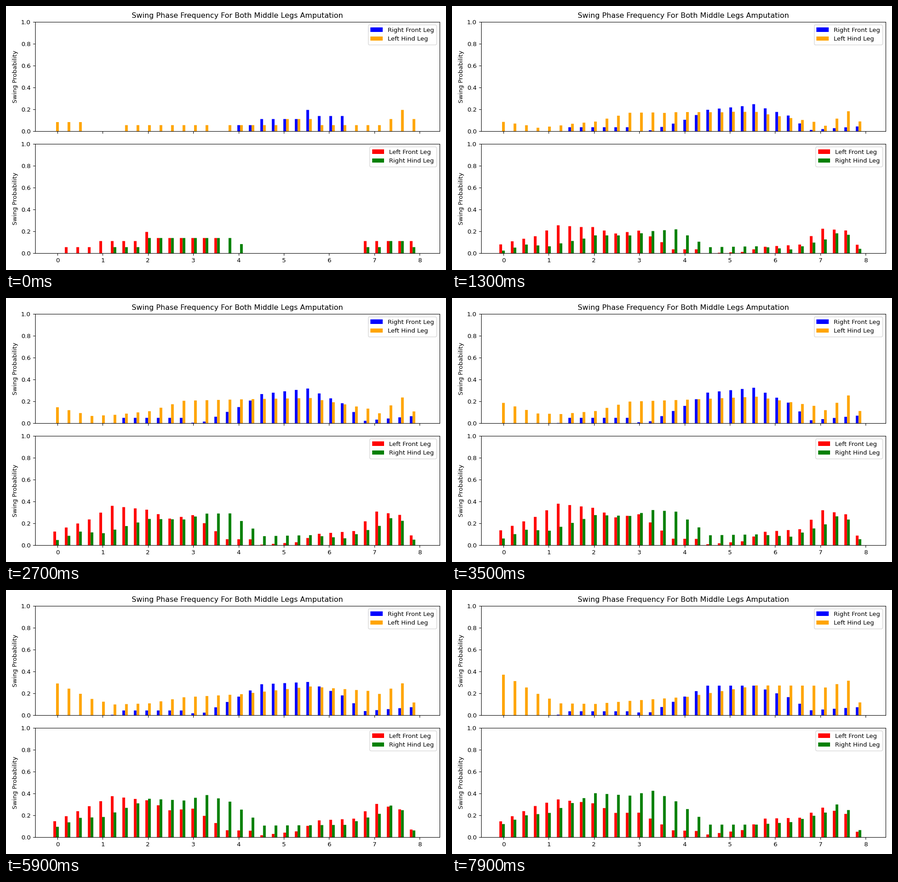
These frames come from a looping animation (966 by 580 pixels, 8 s). A matplotlib script:

```python
import numpy as np
import matplotlib.pyplot as plt
from matplotlib.animation import FuncAnimation

W, H, DPI = 966, 580, 96.6
FRAMES, INTERVAL = 80, 100
BINS = np.arange(32)
X = np.linspace(0, 8, 64)[::2]
BAR = 0.06
YOUNG, MIDDLE, LATE = 18, 48, 78


def cycles(step):
    """Number of recorded cycles, growing evenly."""
    return 36 + 11 * step


class Leg:
    """Swing counts per phase bin; bar height is counts over cycles.

    windows: (first bin, last bin, count) at the start
    points:  (bin, height when young, height when late)
    swell:   how far the middle state rises above the mean of those two
    """

    def __init__(self, windows, points, swell):
        self.first = np.zeros(len(BINS))
        for lo, hi, count in windows:
            self.first[lo:hi + 1] = count
        keys, young, late = zip(*points)
        young = np.interp(BINS, keys, young, left=0)
        late = np.interp(BINS, keys, late, left=0)
        self.young = young * cycles(YOUNG)
        self.middle = swell * (young + late) / 2 * cycles(MIDDLE)
        self.late = late * cycles(LATE)

    def heights(self, step):
        if step < YOUNG:
            u = (step / YOUNG) ** 1.4
            counts = self.first + (self.young - self.first) * u
        else:
            # parabola through three evenly spaced states
            u = (step - YOUNG) / (MIDDLE - YOUNG)
            counts = (self.young * (u - 1) * (u - 2) / 2
                      + self.middle * u * (2 - u)
                      + self.late * u * (u - 1) / 2)
        return np.maximum(counts, 0) / cycles(step)


right_front = Leg(
    [(16, 17, 2), (18, 21, 4), (22, 22, 7), (23, 25, 5)],
    [(5, 0, .005), (6, .046, .036), (11, .046, .036), (12, 0, .025),
     (13, .011, .027), (16, .126, .17), (18, .235, .27), (22, .29, .27),
     (25, .165, .165), (27, .015, .045), (31, .055, .073)],
    swell=1.13)

left_hind = Leg(
    [(0, 2, 3), (6, 13, 2), (15, 19, 2), (20, 22, 4), (23, 28, 2),
     (29, 31, 4), (30, 30, 7)],
    [(0, .098, .37), (3, .04, .195), (5, .067, .108), (8, .105, .103),
     (11, .207, .131), (16, .215, .168), (22, .21, .272), (27, .102, .27),
     (28, .057, .253), (30, .208, .315), (31, .1, .117)],
    swell=1.06)

left_front = Leg(
    [(1, 3, 2), (4, 7, 4), (8, 8, 7), (9, 14, 5), (27, 31, 4)],
    [(0, .102, .145), (3, .19, .285), (5, .31, .345), (8, .28, .31),
     (10, .212, .222), (12, .245, .224), (15, .045, .063), (17, .045, .057),
     (18, 0, .025), (21, .015, .065), (23, .075, .17), (26, .1, .178),
     (28, .27, .27), (30, .25, .213), (31, .085, .05)],
    swell=1.17)

right_hind = Leg(
    [(5, 7, 2), (8, 15, 5), (16, 16, 3), (27, 31, 2), (29, 30, 4)],
    [(0, .03, .12), (2, .1, .2), (4, .08, .222), (8, .19, .402),
     (11, .189, .38), (13, .24, .424), (15, .26, .328), (18, .07, .115),
     (22, .08, .115), (25, .044, .138), (28, .153, .225), (29, .217, .299),
     (30, .2, .248), (31, .044, .065)],
    swell=1.09)

plt.rcParams["font.family"] = "DejaVu Sans"
# the small extra keeps rounding from dropping a pixel
fig, (upper, lower) = plt.subplots(
    2, 1, sharex=True, dpi=DPI, facecolor="white",
    figsize=((W + 0.01) / DPI, (H + 0.01) / DPI))


def add_bars(ax, leg, shift, color, label):
    bars = ax.bar(X + shift, leg.heights(0), BAR, color=color, label=label,
                  snap=False)
    return leg, bars


groups = [
    add_bars(upper, right_front, -BAR, "blue", "Right Front Leg"),
    add_bars(upper, left_hind, 0, "orange", "Left Hind Leg"),
    add_bars(lower, left_front, -BAR, "red", "Left Front Leg"),
    add_bars(lower, right_hind, 0, "green", "Right Hind Leg"),
]
upper.set_title("Swing Phase Frequency For Both Middle Legs Amputation")
for ax in (upper, lower):
    ax.set_xlim(-0.496, 8.436)
    ax.set_ylim(0, 1)
    ax.set_ylabel("Swing Probability")
    ax.legend(loc="upper right")
fig.tight_layout()


def update(frame):
    step = max(frame - 1, 0)
    for leg, bars in groups:
        for bar, height in zip(bars, leg.heights(step)):
            bar.set_height(height)
    return []


anim = FuncAnimation(fig, update, frames=FRAMES, interval=INTERVAL,
                     init_func=lambda: update(0), repeat=True, repeat_delay=0)
plt.show()
```
